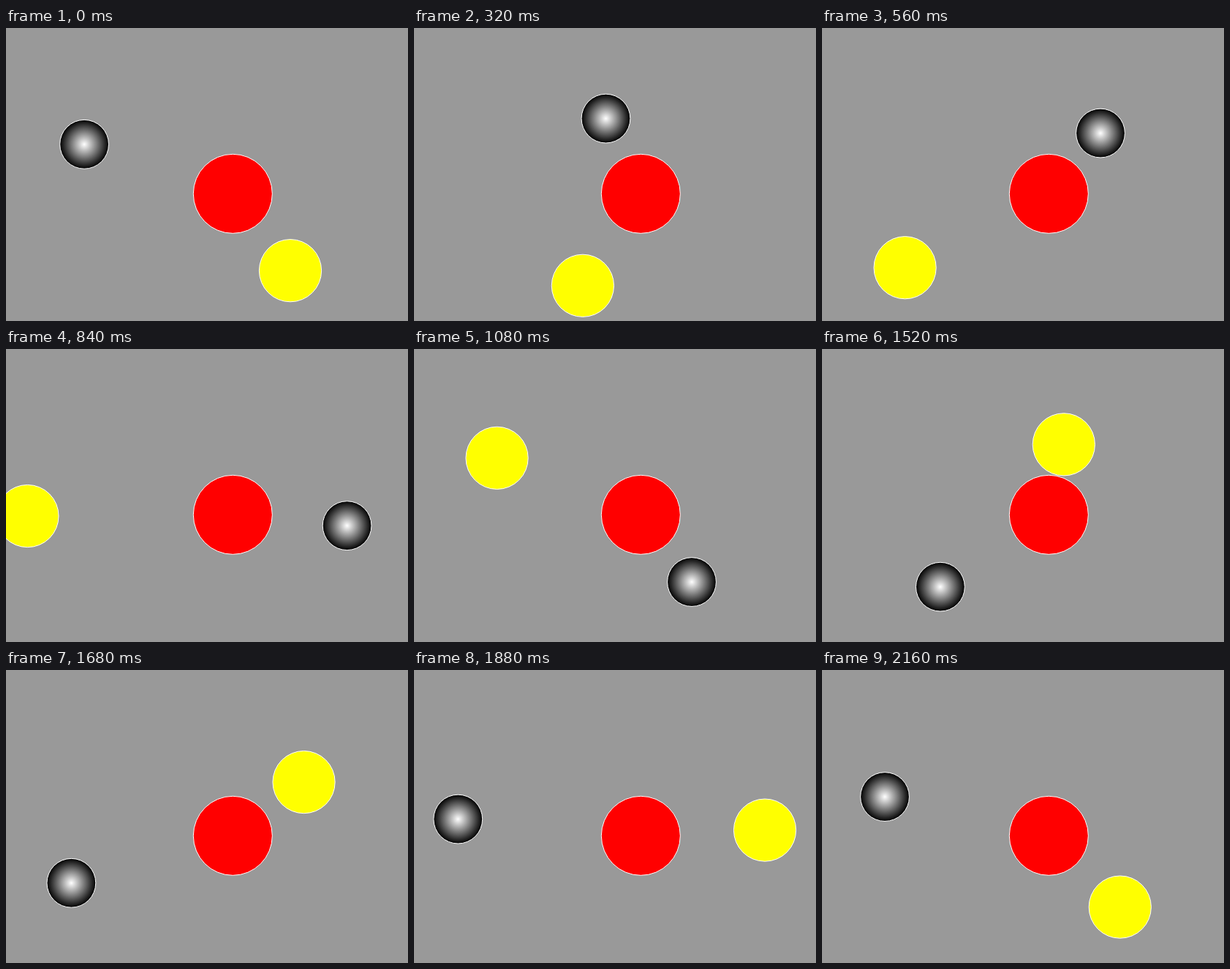
Animation of 550x400 px, one loop 2.4 s. Source, as an HTML page:

```html
<!DOCTYPE html>
<html lang="en">
<head>
<meta charset="utf-8">
<title>Orbiting balls</title>
<style>
  html, body { margin: 0; width: 100%; height: 100%; overflow: hidden; background: #999; }
  svg { display: block; }
  circle { stroke: #fff; stroke-width: 1; }
</style>
</head>
<body>
<svg width="550" height="400" viewBox="0 0 550 400">
  <defs>
    <radialGradient id="shade">
      <stop offset="0" stop-color="#fff"/>
      <stop offset="1" stop-color="#000"/>
    </radialGradient>
    <path id="outer" d="M389 331.2A228 114.5 0 0 1 123 145.2A228 114.5 0 0 1 389 331.2"/>
    <path id="inner" d="M107.1 158.8A207 107 0 0 1 414.1 302.4A207 107 0 0 1 107.1 158.8"/>
  </defs>
  <circle cx="310.3" cy="226.3" r="54" fill="#f00"/>
  <circle id="yellow" r="42.6" fill="#ff0"/>
  <circle id="dark" r="33.4" fill="url(#shade)"/>
</svg>
<script>
const STEP = 40, LOOP = 2400;
const byId = id => document.getElementById(id);

// Each ball follows its path at a constant speed (px per step) and rests after its last step.
const balls = [
  { el: byId('yellow'), path: byId('outer'), speed: 20.06, last: 54 },
  { el: byId('dark'), path: byId('inner'), speed: 20.13, last: 49 }
];

function draw(now) {
  const step = Math.floor(now % LOOP / STEP);
  for (const { el, path, speed, last } of balls) {
    const p = path.getPointAtLength(speed * Math.min(step, last));
    el.setAttribute('cx', p.x);
    el.setAttribute('cy', p.y);
  }
}

function tick() {
  draw(performance.now());
  requestAnimationFrame(tick);
}
tick();
</script>
</body>
</html>
```
